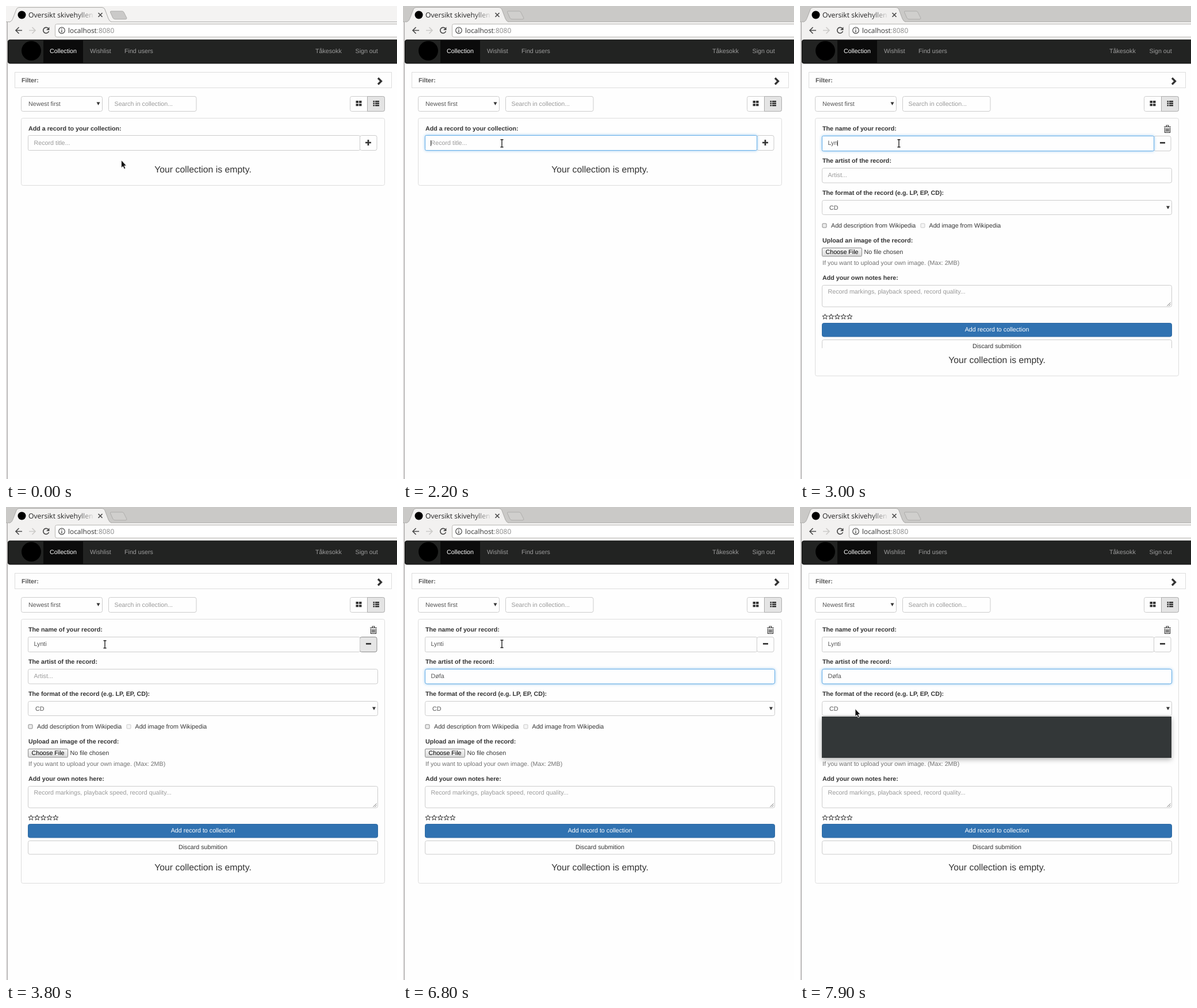
Animation of 680x824 px, one loop 8000 ms. Source, as an HTML page:

```html
<!DOCTYPE html>
<html lang="en">
<head>
<meta charset="utf-8">
<title>Record collection</title>
<style>
  html, body { margin: 0; height: 100%; overflow: hidden; background: #fefefe; }
  svg { display: block; }
  text { font: 10.7px "Liberation Sans", Arial, sans-serif; fill: #333; text-rendering: geometricPrecision; white-space: pre; }
  .ui { font-family: "Open Sans", "Noto Sans", sans-serif; font-size: 11.9px; }
  .bold { font-weight: bold; }
  .hint { fill: #999; }
  .value { fill: #555; }
  .link { fill: #9d9d9d; }
  .mid { text-anchor: middle; }
  .box { fill: #fefefe; stroke: #ccc; }
  .panel { fill: #fefefe; stroke: #ddd; }
  .glow { fill: #fefefe; stroke: #66afe9; filter: drop-shadow(0 0 2.5px rgba(102, 175, 233, .7)); }
  .line { fill: none; stroke: #4c4c4c; stroke-width: 1.7; }
  .icon { fill: #333; }
</style>
</head>
<body>
<svg width="680" height="824" viewBox="0 0 680 824">
  <defs>
    <linearGradient id="fade" gradientUnits="userSpaceOnUse" x1="124" x2="155" y1="0" y2="0">
      <stop stop-color="#222"/><stop offset="1" stop-color="#222" stop-opacity="0"/>
    </linearGradient>
    <linearGradient id="bevel" x2="0" y2="1">
      <stop stop-color="#f6f6f6"/><stop offset="1" stop-color="#dadada"/>
    </linearGradient>
    <clipPath id="formClip"><rect id="formArea" x="30" y="253" width="624" height="12"/></clipPath>
  </defs>

  <!-- browser window -->
  <rect id="tabBar" width="680" height="28"/>
  <rect y="27" width="680" height="32" fill="#f2f1f0"/>
  <path d="M0 27.5H680" stroke="#b3b2b0"/>
  <path d="M5 28C10 27 11 24 13 19L18 6Q19 2.5 23 2.5H167Q171 2.5 172 6L178 22Q180 27 184 28" fill="#f2f1f0" stroke="#aaa9a7"/>
  <rect x="6" y="28" width="178" height="2" fill="#f2f1f0"/>
  <path id="newTab" d="M183 9H202Q204 9 205 11L210 21Q210 23 208 23H190Q187 23 186 21L181.500 11Q181 9 183 9Z" stroke="#aeadab"/>
  <circle cx="27.500" cy="15.500" r="7"/>
  <text class="ui" x="39" y="19.500" style="font-size:12.2px;fill:url(#fade)">Oversikt skivehyllen</text>
  <path class="line" d="M160.500 12l7 7m0 -7l-7 7"/>
  <path class="line" d="M28 42.500H17m5.500 -5.500l-5.500 5.500l5.500 5.500"/>
  <path class="line" style="stroke:#cccbc9" d="M40 42.500H51m-5.500 -5.500l5.500 5.500l-5.500 5.500"/>
  <path class="line" d="M73.500 39A5 5 0 1 0 74.500 44"/>
  <path d="M75.500 36.500v5.500h-5.500z" fill="#4c4c4c"/>
  <rect x="85.500" y="31.500" width="610" height="22.500" rx="3" fill="#fff" stroke="#b8b6b3"/>
  <circle class="line" cx="97" cy="42.500" r="5.300" style="stroke-width:1.200"/>
  <path d="M97 39v1.400m0 1.300v4.200" stroke="#4c4c4c" stroke-width="1.400"/>
  <text class="ui" x="108" y="46.500">localhost<tspan fill="#888">:8080</tspan></text>
  <rect y="59" width="2" height="765" fill="#f2f1f0"/>
  <path d="M2.250 28V824" stroke="#adacab" stroke-width="1.500"/>

  <!-- navigation -->
  <rect x="3.500" y="59" width="690" height="41" rx="3" fill="#222322" stroke="#0b0b0b"/>
  <rect x="65" y="60" width="69" height="39" fill="#0b0b0b"/>
  <circle cx="44" cy="78" r="17"/>
  <text x="76" y="82" fill="#fff" style="fill:#fff">Collection</text>
  <text class="link" x="146" y="82">Wishlist</text>
  <text class="link" x="206" y="82">Find users</text>
  <text class="link" x="538" y="82">Tåkesokk</text>
  <text class="link" x="607.500" y="82">Sign out</text>

  <!-- toolbar -->
  <rect class="panel" x="15.500" y="115.500" width="655" height="27"/>
  <text class="bold value" x="27" y="133">Filter:</text>
  <path d="M647 125.500l5.500 5.500l-5.500 5.500" fill="none" stroke="#333" stroke-width="3.300"/>
  <rect class="box" x="26.500" y="157.500" width="141" height="26" rx="3"/>
  <text class="value" x="39" y="174">Newest first</text>
  <path class="icon" d="M157.500 167.500h6l-3 5.500z"/>
  <rect class="box" x="178.500" y="157.500" width="152.500" height="26" rx="3"/>
  <text class="hint" x="188.500" y="174">Search in collection...</text>
  <rect class="box" x="598.500" y="157.500" width="60" height="26" rx="3"/>
  <path d="M628.500 157.500h27q3 0 3 3v20q0 3 -3 3h-27z" fill="#e4e4e4" stroke="#adadad"/>
  <path class="icon" d="M608.500 165h4.500v4h-4.500zm5.500 0h4.500v4h-4.500zm-5.500 5.200h4.500v4h-4.500zm5.500 0h4.500v4h-4.500z"/>
  <path d="M638.500 166.200h2.500m1 0h7m-10.500 3.500h2.500m1 0h7m-10.500 3.500h2.500m1 0h7" stroke="#333" stroke-width="2.500"/>

  <!-- collection panel -->
  <rect id="panel" class="panel" x="26.500" y="195.500" width="632" height="117" rx="3"/>
  <text id="nameLabel" class="bold" x="39" y="217"></text>
  <g id="trash" fill="none" stroke="#333" stroke-width="1.200">
    <path d="M633 210.500h12m-8 0v-2.500h4v2.500m-6.500 1.500v8.500h9v-8.500m-6.500 1v6m2 -6v6m2 -6v6"/>
  </g>
  <g id="nameRow">
    <rect id="toggle" class="box" x="615.500" y="225.500" width="29.500" height="26" rx="3"/>
    <rect class="box" x="38.500" y="225.500" width="577" height="26" rx="2"/>
    <rect id="nameGlow" class="glow" x="38.500" y="225.500" width="577" height="26" rx="2"/>
  </g>
  <path id="plus" d="M625 238h10m-5 -5v10" stroke="#333" stroke-width="2.700"/>
  <path id="minus" d="M626 238.300h9" stroke="#333" stroke-width="2.700"/>
  <text id="nameHint" class="hint" x="48.500" y="242">Record title...</text>
  <text id="nameText" class="value" x="48.500" y="242"></text>
  <path id="nameCaret" d="M0 234v10" stroke="#333"/>

  <g id="form" clip-path="url(#formClip)">
    <text class="bold" x="39" y="273">The artist of the record:</text>
    <rect class="box" x="38.500" y="282.500" width="608" height="25.500" rx="3"/>
    <rect id="artistGlow" class="glow" x="38.500" y="282.500" width="608" height="25.500" rx="3"/>
    <text id="artistHint" class="hint" x="48.500" y="298">Artist...</text>
    <text id="artistText" class="value" x="48.500" y="298"></text>
    <path id="artistCaret" d="M0 290v10" stroke="#333"/>

    <text class="bold" x="39" y="329">The format of the record (e.g. LP, EP, CD):</text>
    <rect class="box" x="38.500" y="338.500" width="608" height="25" rx="3"/>
    <text class="value" x="51" y="354.500">CD</text>
    <path class="icon" d="M637 348.500h6l-3 5.500z"/>

    <rect x="39" y="379" width="7" height="7" rx="1" fill="#ececec" stroke="#8a8a8a"/>
    <text x="54" y="385.500">Add description from Wikipedia</text>
    <rect x="210" y="379" width="7" height="7" rx="1" fill="#f5f5f5" stroke="#c8c8c8"/>
    <text x="224.500" y="385.500">Add image from Wikipedia</text>

    <text class="bold" x="39" y="412">Upload an image of the record:</text>
    <rect x="38.500" y="421.500" width="69" height="14.500" rx="1.500" fill="url(#bevel)" stroke="#888"/>
    <text x="44.500" y="431.500" style="fill:#000">Choose File</text>
    <text x="111.500" y="431.500">No file chosen</text>
    <text x="39" y="451" style="fill:#737373">If you want to upload your own image. (Max: 2MB)</text>

    <text class="bold" x="39" y="476.500">Add your own notes here:</text>
    <rect class="box" x="38.500" y="486.500" width="608" height="37.500" rx="3"/>
    <text class="hint" x="48.500" y="500.500">Record markings, playback speed, record quality...</text>
    <path d="M638.500 522.500l6 -6m-3 6l3 -3" stroke="#777"/>
    <g id="stars" fill="none" stroke="#333"></g>

    <rect x="38.500" y="552.500" width="608" height="23.500" rx="3" fill="#3072b1" stroke="#2c68a1"/>
    <text class="mid" x="342.500" y="567" style="fill:#fff">Add record to collection</text>
    <rect class="box" x="38.500" y="581.500" width="608" height="23.500" rx="3"/>
    <text class="mid" x="342.500" y="596">Discard submition</text>
  </g>
  <text id="empty" class="mid" x="342.500" y="290" style="font-size:15.800px">Your collection is empty.</text>

  <rect id="menu" x="38" y="365" width="608" height="72" fill="#333738" style="filter:drop-shadow(0 3px 4px rgba(0,0,0,.3))"/>

  <g id="pointer">
    <path id="arrow" d="M0 0V13.500L3 10.800L5 15.500L7.300 14.500L5.300 9.800H9Z" fill="#111" stroke="#fff" stroke-width=".8"/>
    <g id="beam" fill="none">
      <path d="M-3 -6.500h6m-3 0v13m-3 0h6" stroke="#fff" stroke-width="3"/>
      <path d="M-2.500 -6.500h5m-2.500 0v13m-2.500 0h5" stroke="#222" stroke-width="1.400"/>
    </g>
  </g>
</svg>
<script>
const LOOP = 8000, STEP = 100, TEXT_X = 48.5, FORM_HEIGHT = 342;
const el = id => document.getElementById(id);
const show = (id, on) => el(id).setAttribute('visibility', on ? 'visible' : 'hidden');
const set = (id, attrs) => { for (const key in attrs) el(id).setAttribute(key, attrs[key]); };
const ramp = (t, start, length) => Math.min(1, Math.max(0, (t - start) / length));
const during = (t, spans) => spans.some(([from, to]) => t >= from && t < to);

const fields = {
  name: { text: 'Lynti', keys: [2500, 2700, 2900, 3100, 3200], caret: [[1200, 1700], [2200, 3700]], focus: 1080, blur: 3650 },
  artist: { text: 'Døfa', keys: [5400, 5700, 5900, 5900], caret: [[4400, 4900], [5400, 6400], [7100, 7600]], focus: 4290, blur: LOOP }
};

// time, x, y, cursor shape
const pointerPath = [
  [0, 200.5, 268.5, 'arrow'], [200, 188, 256, 'arrow'], [300, 177, 245, 'beam'], [400, 172, 239.3, 'beam'],
  [6800, 172, 238.5, 'beam'], [7100, 165, 251, 'beam'], [7200, 150, 270, 'arrow'],
  [7500, 128, 296, 'beam'], [7600, 104, 335, 'arrow'], [7700, 96, 351.5, 'arrow']
];

// cubic-bezier(.25, .1, .25, 1)
function ease(p) {
  let low = 0, high = 1, s = p;
  for (let i = 0; i < 20; i++) {
    s = (low + high) / 2;
    if (.75 * s * (1 - s) + s ** 3 < p) low = s; else high = s;
  }
  return .3 * s * (1 - s) ** 2 + 3 * s * s * (1 - s) + s ** 3;
}

function star(cx, cy) {
  const points = Array.from({ length: 10 }, (_, i) => {
    const r = i % 2 ? 2 : 4.8, a = (i / 5 - .5) * Math.PI;
    return (cx + r * Math.cos(a)).toFixed(2) + ',' + (cy + r * Math.sin(a)).toFixed(2);
  });
  return `<polygon points="${points.join(' ')}"/>`;
}
el('stars').innerHTML = [0, 1, 2, 3, 4].map(i => star(43.5 + i * 10.7, 541.5)).join('');

function drawField(id, t) {
  const { text, keys, caret, focus, blur } = fields[id];
  const typed = text.slice(0, keys.filter(k => k <= t).length);
  const label = el(id + 'Text');
  label.textContent = typed;
  show(id + 'Hint', !typed);
  show(id + 'Caret', during(t, caret));
  const x = TEXT_X + (typed ? label.getComputedTextLength() : 0);
  set(id + 'Caret', { transform: `translate(${x} 0)` });
  set(id + 'Glow', { opacity: ramp(t, focus, 150) * (1 - ramp(t, blur, 150)) });
}

function draw(t) {
  const active = t >= 1000, open = t >= 2500;
  set('tabBar', { fill: active ? '#cac9c7' : '#f4f3f2' });
  set('newTab', { fill: active ? '#d0cfcd' : '#cac9c8' });

  el('nameLabel').textContent = open ? 'The name of your record:' : 'Add a record to your collection:';
  show('trash', open);
  show('minus', open);
  show('plus', !open);
  const nudge = open ? 1 : 0;
  set('nameRow', { transform: `translate(0 ${nudge})` });
  const pressed = during(t, [[3700, 4300]]);
  el('toggle').style.cssText = pressed ? 'fill:#e6e6e6;stroke:#8c8c8c' : '';

  const grown = FORM_HEIGHT * ease(ramp(t, 2730, 350));
  show('form', grown > 1);
  set('formArea', { height: 12 + grown });
  set('panel', { height: 117 + nudge + grown });
  set('empty', { transform: `translate(0 ${nudge + grown})` });

  drawField('name', t);
  drawField('artist', t);
  if (grown <= 1) ['artistHint', 'artistCaret'].forEach(id => show(id, false));
  show('menu', t >= 7900);

  const [, x, y, shape] = pointerPath.filter(p => p[0] <= t).pop();
  set('pointer', { transform: `translate(${x} ${y})` });
  show('arrow', shape === 'arrow');
  show('beam', shape === 'beam');
}

const begin = performance.now();
function tick() {
  const t = (performance.now() - begin) % LOOP;
  draw(Math.floor(t / STEP) * STEP);
  requestAnimationFrame(tick);
}
tick();
</script>
</body>
</html>
```
